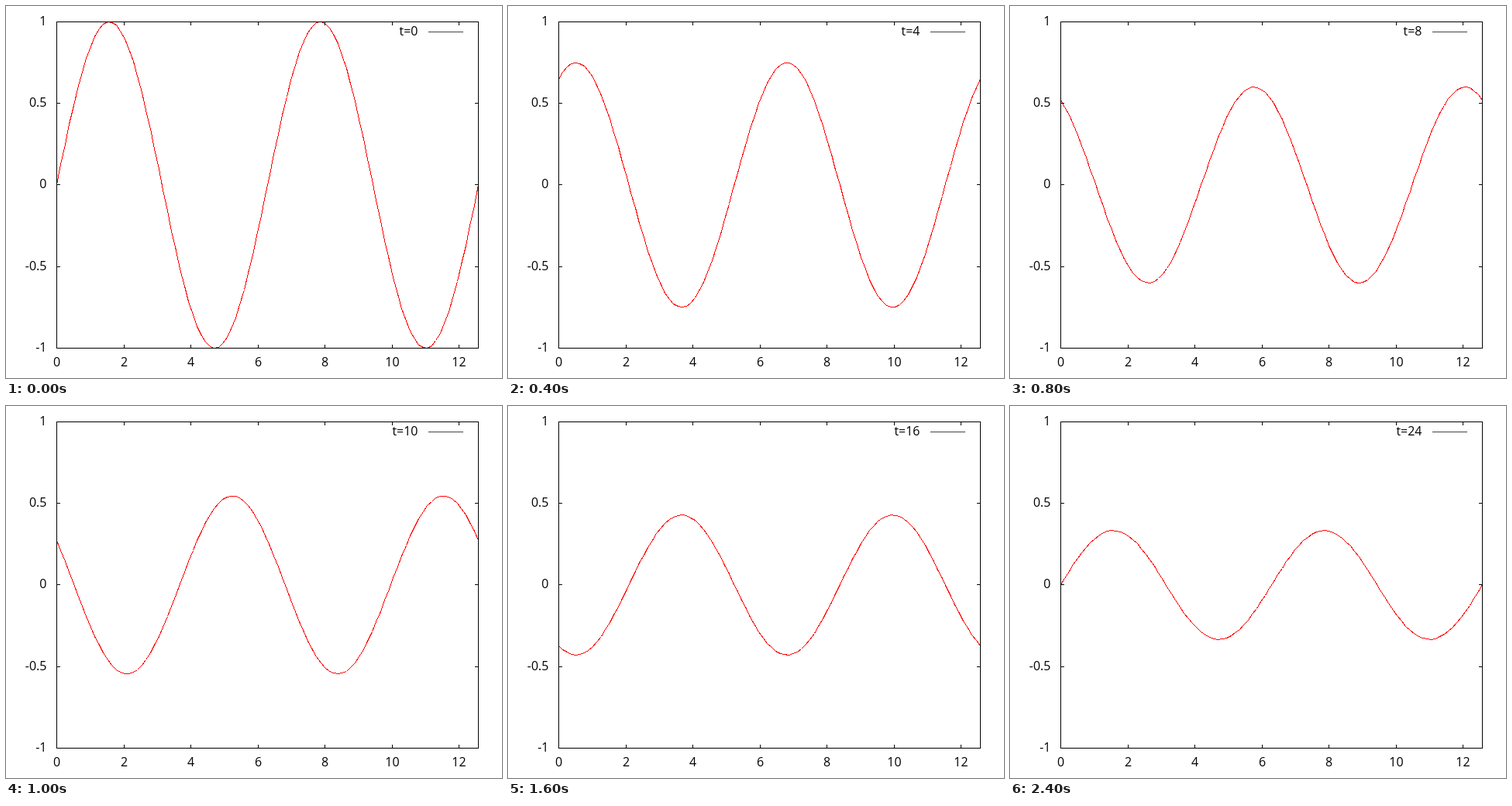
Write an HTML page that moves like this. It is 640x480 px and loops after 2500 ms.

```html
<!DOCTYPE html>
<html lang="en">
<head>
<meta charset="utf-8">
<title>Decaying travelling wave</title>
<style>
  html, body { margin: 0; width: 100%; height: 100%; overflow: hidden; background: #fff; }
  svg { display: block; }
  path { fill: none; stroke: #000; shape-rendering: crispEdges; }
  text { font: 16px "Open Sans", "Noto Sans", sans-serif; }
</style>
</head>
<body>
<svg width="640" height="480">
  <path id="wave" style="stroke: #f00"/>
  <path d="M545 33.5H590" style="stroke: #444"/>
  <path id="axes"/>
  <g id="labels"></g>
  <text id="time" x="531.5" y="38" text-anchor="end"></text>
</svg>
<script>
const LEFT = 65, RIGHT = 609, TOP = 20, BOTTOM = 441;
const SPAN = 4 * Math.PI, SAMPLES = 100, STEPS = 25, STEP_MS = 100, TICK = 5;
const $ = id => document.getElementById(id);
const px = x => Math.round(LEFT + (RIGHT - LEFT) * x / SPAN) + 0.5;
const py = y => Math.round(BOTTOM - (BOTTOM - TOP) * (y + 1) / 2 - 0.01) + 0.5;

function label(text, x, y, anchor) {
  const el = document.createElementNS("http://www.w3.org/2000/svg", "text");
  el.setAttribute("x", x);
  el.setAttribute("y", y);
  el.setAttribute("text-anchor", anchor);
  el.textContent = text;
  $("labels").append(el);
}

function drawAxes() {
  let d = `M${LEFT + 0.5} ${TOP + 0.5}H${RIGHT + 0.5}V${BOTTOM + 0.5}H${LEFT + 0.5}Z`;
  for (let x = 0; x <= 12; x += 2) {
    d += `M${px(x)} ${TOP}v${TICK}M${px(x)} ${BOTTOM + 1}v${-TICK}`;
    label(x, px(x), 465, "middle");
  }
  for (let y = -1; y <= 1; y += 0.5) {
    d += `M${LEFT} ${py(y)}h${TICK}M${RIGHT + 1} ${py(y)}h${-TICK}`;
    label(y, 52.5, py(y) + 4.5, "end");
  }
  $("axes").setAttribute("d", d);
}

function drawWave(t) {
  const points = Array.from({ length: SAMPLES }, (_, i) => {
    const x = SPAN * i / (SAMPLES - 1);
    return `${px(x)} ${py(12 / (12 + t) * Math.sin(x + Math.PI * t / 12))}`;
  });
  $("wave").setAttribute("d", "M" + points.join("L"));
  $("time").textContent = "t=" + t;
}

const start = performance.now();
function frame() {
  drawWave(Math.floor((performance.now() - start) / STEP_MS) % STEPS);
  requestAnimationFrame(frame);
}
drawAxes();
drawWave(0);
requestAnimationFrame(frame);
</script>
</body>
</html>
```
